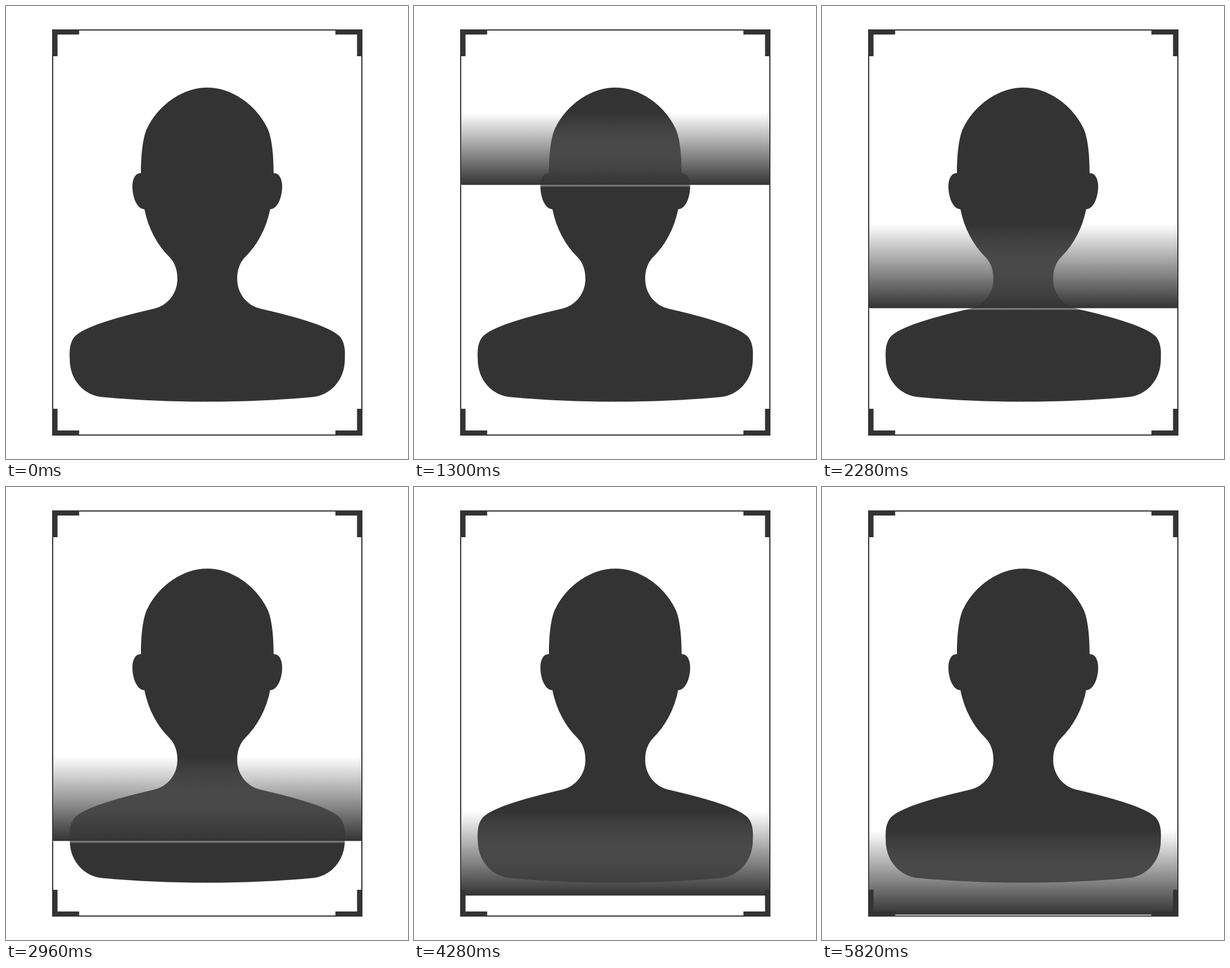
These frames come from a looping animation (706x794 px, 5860 ms). An HTML page with a canvas:

```html
<!DOCTYPE html>
<html lang="en">
<head>
<meta charset="utf-8">
<title>Portrait scan</title>
<style>
html, body { margin: 0; width: 100%; height: 100%; overflow: hidden; background: #fff; }
canvas { display: block; }
</style>
</head>
<body>
<canvas id="stage" width="706" height="794"></canvas>
<script>
const ctx = document.getElementById('stage').getContext('2d');
const LOOP = 5860, STEP = 20;
const INK = '#333';
const FRAME = { left: 81, top: 41, right: 626, bottom: 753 };
const BAND = { left: 82, right: 624.5, height: 148, growTime: 1520, floor: 751.3, glow: 4 };

// Leading edge of the scan band: [ms, y]
const EDGE = [
  [0, 42], [250, 66], [500, 109], [620, 136], [1220, 293], [1820, 443],
  [2420, 552], [3020, 627], [3620, 679.5], [4220, 713.5], [4820, 735.5],
  [5420, 747], [5860, 750]
];

// Left half of the portrait; the right half is its mirror image
const half = new Path2D(
  'M354.5 143 L353.5 143 C312 143 269 171 248 214 C240 230 237 262 237 293 ' +
  'C228 292 222 302 222 316 C222 340 233 357 243 356 ' +
  'C250 390 265 418 287 440 C296 449 301 462 301 478 ' +
  'C301 504 284 525 260 530.5 C205 543 142 560 122 578 ' +
  'C112 588 111 603 112 620 C112 655 137 683 170 685.5 ' +
  'C230 691 290 693.5 353.5 693.5 L354.5 693.5 Z');

function slope(i) {
  const a = EDGE[Math.max(i - 1, 0)];
  const b = EDGE[Math.min(i + 1, EDGE.length - 1)];
  return (b[1] - a[1]) / (b[0] - a[0]);
}

// Cubic Hermite through the edge points
function edgeAt(t) {
  let i = 0;
  while (i < EDGE.length - 2 && t >= EDGE[i + 1][0]) i++;
  const [t0, y0] = EDGE[i], [t1, y1] = EDGE[i + 1];
  const d = t1 - t0, u = (t - t0) / d, v = 1 - u;
  return v * v * (1 + 2 * u) * y0 + u * u * (3 - 2 * u) * y1 +
    d * u * v * (v * slope(i) - u * slope(i + 1));
}

function drawPortrait() {
  ctx.fillStyle = INK;
  ctx.fill(half);
  ctx.save();
  ctx.translate(707, 0);
  ctx.scale(-1, 1);
  ctx.fill(half);
  ctx.restore();
}

function drawFrame() {
  const { left, top, right, bottom } = FRAME;
  ctx.strokeStyle = INK;
  ctx.lineWidth = 2;
  ctx.strokeRect(left + 1, top + 1, right - left - 2, bottom - top - 2);
}

// Corner bracket growing inwards from (x, y)
function bracket(x, y, dx, dy) {
  ctx.fillStyle = INK;
  ctx.fillRect(x, y, dx * 47.5, dy * 9);
  ctx.fillRect(x, y, dx * 9.5, dy * 47);
}

function drawBand(t) {
  const edge = edgeAt(t);
  const height = BAND.height * Math.min(1, t / BAND.growTime);
  const top = edge - height, width = BAND.right - BAND.left;

  ctx.save();
  ctx.beginPath();
  ctx.rect(BAND.left, FRAME.top + 1, width, BAND.floor - FRAME.top - 1);
  ctx.clip();

  const shade = ctx.createLinearGradient(0, top, 0, edge);
  const stops = 20;
  for (let i = 0; i <= stops; i++) {
    const p = i / stops, q = 1 - p;
    const alpha = p + 0.43 * p * q;
    const grey = Math.round(51 + 88 * q / (1 + 0.43 * q));
    shade.addColorStop(p, `rgba(${grey},${grey},${grey},${alpha})`);
  }
  ctx.fillStyle = shade;
  ctx.fillRect(BAND.left, top, width, height);

  const glow = ctx.createLinearGradient(0, edge, 0, edge + BAND.glow);
  glow.addColorStop(0, 'rgba(255,255,255,0.55)');
  glow.addColorStop(1, 'rgba(255,255,255,0)');
  ctx.fillStyle = glow;
  ctx.fillRect(BAND.left, edge, width, BAND.glow);
  ctx.restore();
}

function draw() {
  const t = Math.floor(performance.now() % LOOP / STEP) * STEP;
  const { left, top, right, bottom } = FRAME;
  ctx.fillStyle = '#fff';
  ctx.fillRect(0, 0, 706, 794);
  drawPortrait();
  drawFrame();
  bracket(left, top, 1, 1);
  bracket(right, top, -1, 1);
  if (t >= 40) drawBand(t);
  bracket(left, bottom, 1, -1);
  bracket(right, bottom, -1, -1);
  requestAnimationFrame(draw);
}
draw();
</script>
</body>
</html>
```
